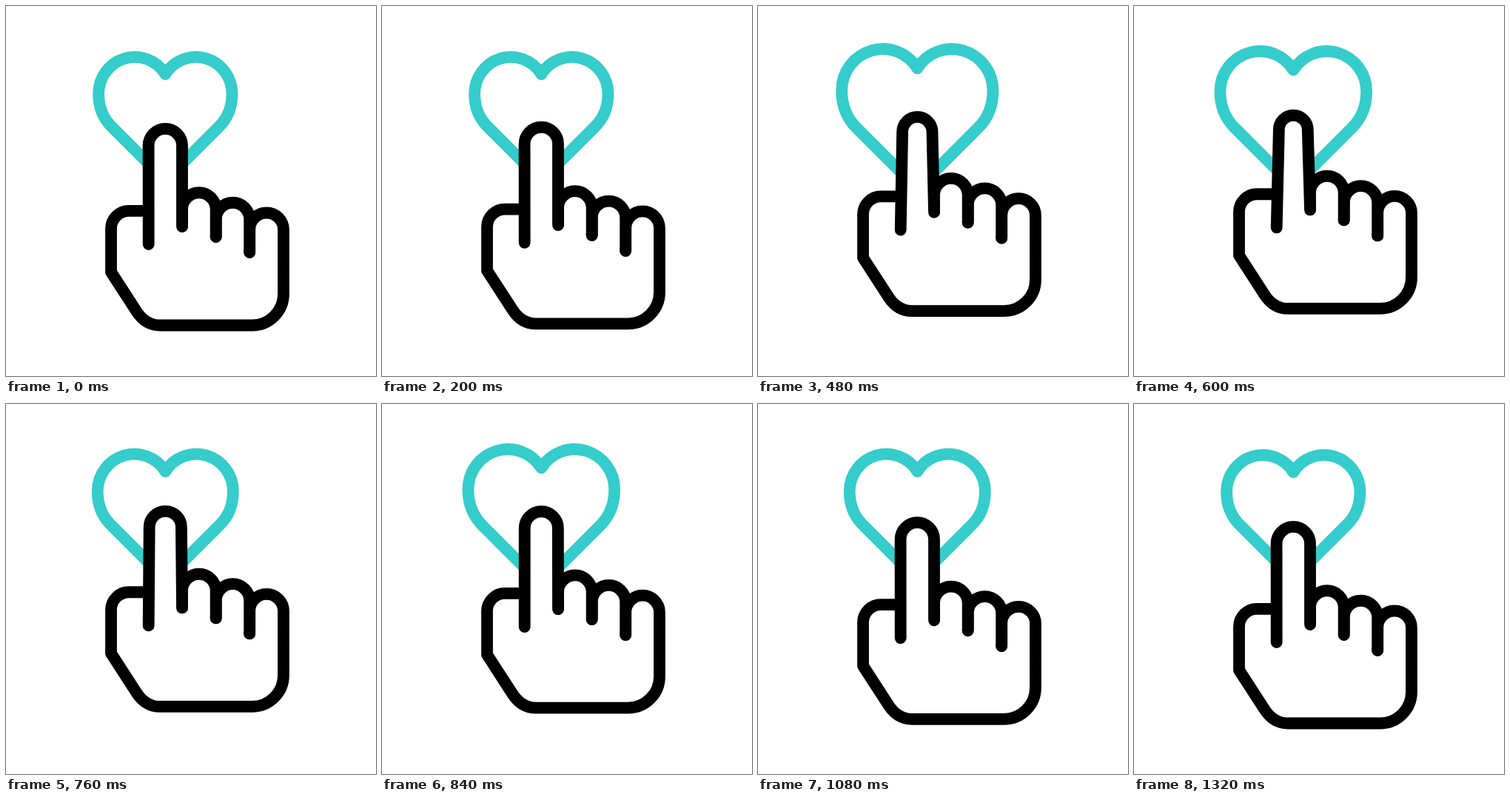
An HTML page for the animation above (1400 ms loop, 500 px wide and 500 px high).

```html
<!DOCTYPE html>
<html lang="en">
<head>
<meta charset="utf-8">
<title>Tap the heart</title>
<style>
  html, body { margin: 0; width: 100%; height: 100%; overflow: hidden; background: #fff; }
  svg { display: block; width: 100vw; height: 100vh; }
  path { stroke-width: 15.8; stroke-linecap: round; stroke-linejoin: round; }
</style>
</head>
<body>
<svg viewBox="0 0 500 500">
  <path id="heart" fill="none" stroke="#35cccc"/>
  <g id="hand" fill="#fff" stroke="#000">
    <path d="M192.7 276.8H166A24 24 0 0 0 142 300.8V359.6L176.6 413C184.5 425 195 431.5 208 431.5H332.5A42.5 42.5 0 0 0 375 389V302.4A22.9 22.9 0 0 0 329.2 302.4V333"/>
    <path d="M283.7 312V288.5A22.75 22.75 0 0 1 329.2 288.5V333"/>
    <path d="M238 298V275.1A22.85 22.85 0 0 1 283.7 275.1V312"/>
    <path id="finger"/>
  </g>
</svg>
<script>
  const LOOP = 1400, STEP = 40;
  const CX = 215.3, HEART_Y = 151;
  const heart = document.getElementById('heart');
  const hand = document.getElementById('hand');
  const finger = document.getElementById('finger');

  const progress = (t, from, to) => Math.min(1, Math.max(0, (t - from) / (to - from)));
  const smooth = u => u * u * (3 - 2 * u);

  // cubic-bezier(.55, 0, .45, 1)
  function strongEase(u) {
    let lo = 0, hi = 1;
    for (let i = 0; i < 24; i++) {
      const s = (lo + hi) / 2, r = 1 - s;
      const x = 1.65 * s * r * r + 1.35 * s * s * r + s * s * s;
      if (x < u) lo = s; else hi = s;
    }
    return smooth((lo + hi) / 2);
  }

  // Rises from 0 to 1 and falls back to 0
  const pulse = (t, start, peak, end, ease = smooth) =>
    t < peak ? ease(progress(t, start, peak)) : 1 - ease(progress(t, peak, end));

  function heartPath(scale) {
    const at = (x, y) => `${CX + x * scale} ${HEART_Y + y * scale} `;
    const half = side =>
      `M${at(0, -59)}A${48.9 * scale} ${49.6 * scale} 0 0 ${side < 0 ? 0 : 1} ${at(side * 90.2, -32.5)}` +
      `C${at(side * 90.2, -16)}${at(side * 84.5, 0)}${at(side * 73, 11.6)}L${at(0, 84.6)}`;
    return half(-1) + half(1);
  }

  function fingerPath(press) {
    const r = 22.7 - 3.4 * press, y = 188.6 + 1.2 * press;
    return `M192.7 322L${CX - r} ${y}A${r} ${r} 0 0 1 ${CX + r} ${y}L238 298`;
  }

  function draw(time) {
    const t = Math.floor((time % LOOP) / STEP) * STEP;
    const beat = pulse(t, 320, 520, 720) + pulse(t, 720, 920, 1120);
    const lift = pulse(t, 40, 680, 1320, strongEase);
    const press = pulse(t, 320, 560, 880);
    heart.setAttribute('d', heartPath(1 + 0.148 * beat));
    hand.setAttribute('transform', `translate(0 ${-23 * lift})`);
    finger.setAttribute('d', fingerPath(press));
  }

  const start = performance.now();
  function tick() {
    draw(performance.now() - start);
    requestAnimationFrame(tick);
  }
  draw(0);
  requestAnimationFrame(tick);
</script>
</body>
</html>
```
